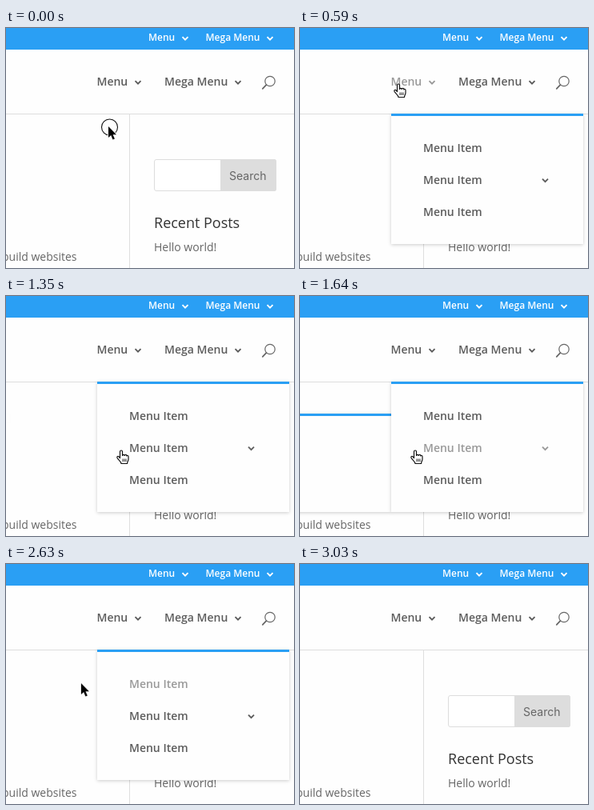
An HTML page for the animation above (4050 ms loop, 360 by 300 pixels).

```html
<!DOCTYPE html>
<html lang="en">
<head>
<meta charset="utf-8">
<title>Dropdown menu</title>
<style>
  html, body { margin: 0; width: 100%; height: 100%; overflow: hidden; background: #fefefe; }
  svg { display: block; width: 360px; height: 300px; }
  text { font: 400 14px "Open Sans", sans-serif; fill: #666; }
  .nav text { font-weight: 600; fill: #5c5c5c; }
  .nav use { stroke: #5c5c5c; }
  .top text { font-size: 12px; fill: #fff; }
  .top use { stroke: #fff; }
  .panel { fill: #fefefe; filter: drop-shadow(0 1px 2px rgba(0, 0, 0, .2)); }
  .blue { fill: #2a9ff4; }

  /* One loop is 4050 ms */
  .anim { animation: 4050ms linear infinite; }
  .drop { animation-timing-function: ease-in-out; }
  .flip { animation-timing-function: step-end; }

  #menu { transform-origin: 234px 107px; animation-name: menu; }
  #submenu { transform-origin: -6px 147px; animation-name: submenu; }
  #link { animation-name: link; }
  #item1 { animation-name: item1; }
  #item2 { animation-name: item2; }
  #pointer { animation-name: move; }
  #ring { animation-name: ring; }
  #arrow { animation-name: arrow; }
  #hand { animation-name: hand; }

  @keyframes menu {
    0%, 4.07%, 73.83%, 100% { transform: scale(0); opacity: 0; }
    11.23%, 66.42% { transform: scale(1); opacity: 1; }
  }
  @keyframes submenu {
    0%, 31.85%, 56.69%, 100% { transform: scale(0); opacity: 0; }
    39.01%, 49.53% { transform: scale(1); opacity: 1; }
  }
  @keyframes link {
    0%, 4.07%, 32.35%, 100% { opacity: 1; }
    11.23%, 27.41% { opacity: .62; }
  }
  @keyframes item1 {
    0%, 53.09%, 69.14%, 100% { opacity: 1; }
    59.26%, 64.94% { opacity: .62; }
  }
  @keyframes item2 {
    0%, 32.84%, 58.02%, 100% { opacity: 1; }
    39.51%, 51.85% { opacity: .62; }
  }
  @keyframes move {
    0%, 1.48% { transform: translate(128px, 123px); }
    8.89% { transform: translate(127px, 86px); }
    11.6%, 21.73% { transform: translate(123px, 70px); }
    27.41% { transform: translate(140px, 148px); }
    33.33%, 49.14% { transform: translate(144px, 193px); }
    51.85% { transform: translate(144px, 161px); }
    57.53%, 61.98% { transform: translate(138px, 151px); }
    64.94% { transform: translate(94px, 149px); }
    70.86%, 100% { transform: translate(56px, 150px); }
  }
  @keyframes ring {
    0% { opacity: 1; }
    1.48%, 100% { opacity: 0; }
  }
  @keyframes arrow {
    0%, 63.58% { opacity: 1; }
    4.69%, 73.83%, 100% { opacity: 0; }
  }
  @keyframes hand {
    0%, 63.58%, 100% { opacity: 0; }
    4.69% { opacity: 1; }
  }
</style>
</head>
<body>
<svg viewBox="0 0 360 300">
  <defs>
    <path id="chevron" d="M-3.5-1.8 0 1.7 3.5-1.8" fill="none" stroke-width="1.9"/>
  </defs>

  <!-- Page -->
  <path d="M0 107.5H360M154.5 108V300" stroke="#dedede"/>
  <text x="88.5" y="291" text-anchor="end">build websites</text>
  <rect x="185.5" y="164.5" width="152" height="39" rx="2.5" fill="#fff" stroke="#ddd"/>
  <path d="M268 164h67a3 3 0 0 1 3 3v34a3 3 0 0 1-3 3h-67Z" fill="#ddd"/>
  <text x="279" y="190" style="font-family: Inter, sans-serif">Search</text>
  <text x="185" y="250" style="font-size: 18px; fill: #333">Recent Posts</text>
  <text x="185" y="279">Hello world!</text>

  <!-- Header -->
  <rect class="blue" width="360" height="27"/>
  <g class="nav top">
    <text x="178" y="16">Menu</text>
    <use href="#chevron" x="224" y="13"/>
    <text x="249.5" y="16">Mega Menu</text>
    <use href="#chevron" x="330" y="13"/>
  </g>
  <g class="nav">
    <g id="link" class="anim">
      <text x="113.5" y="72">Menu</text>
      <use href="#chevron" x="165" y="68"/>
    </g>
    <text x="198" y="72">Mega Menu</text>
    <use href="#chevron" x="290" y="68"/>
  </g>
  <g fill="none" stroke="#666" stroke-linecap="round">
    <circle cx="330" cy="66.5" r="6.2" stroke-width="1.2"/>
    <path d="M325.3 71.2 320.8 75.8" stroke-width="1.8"/>
  </g>

  <!-- Dropdowns -->
  <g id="submenu" class="anim drop">
    <rect class="panel" x="-126" y="147" width="240" height="123"/>
    <rect class="blue" x="-126" y="147" width="240" height="3"/>
  </g>
  <g id="menu" class="anim drop nav">
    <rect class="panel" x="114" y="107" width="240" height="163"/>
    <rect class="blue" x="114" y="107" width="240" height="3"/>
    <text id="item1" class="anim" x="154" y="155">Menu Item</text>
    <g id="item2" class="anim">
      <text x="154" y="195">Menu Item</text>
      <use href="#chevron" x="306.5" y="190.5"/>
    </g>
    <text x="154" y="235">Menu Item</text>
  </g>

  <!-- Pointer -->
  <g id="pointer" class="anim">
    <circle id="ring" class="anim flip" cx="1.5" cy="1" r="10" fill="none" stroke="#111" stroke-width="1.1"/>
    <path id="arrow" class="anim flip" d="M0 0V14l3.2-3 2.3 5.4 2.4-1-2.3-5.2H10Z"
      stroke="#fff" stroke-width="1.6" paint-order="stroke"/>
    <g id="hand" class="anim flip" stroke="#111" stroke-linejoin="round">
      <path transform="translate(-6.5 -1)" fill="#fff" stroke-width="1.2"
        d="M5 10.5V2.5a1.5 1.5 0 0 1 3 0V7.5a1.4 1.4 0 0 1 2.7 0 1.3 1.3 0 0 1 2.6.5 1.2 1.2 0 0 1 2.2.8V12c0 2-1.5 3-1.5 5.5H6.5C6.5 15 3 13 1.5 10.2c-.8-1.6 1.2-2.6 2.2-1.2Z"/>
      <path d="M2 10.5v3.5M4 10.5v3.5M6 10.5v3.5" stroke-width=".9"/>
    </g>
  </g>
</svg>
</body>
</html>
```
